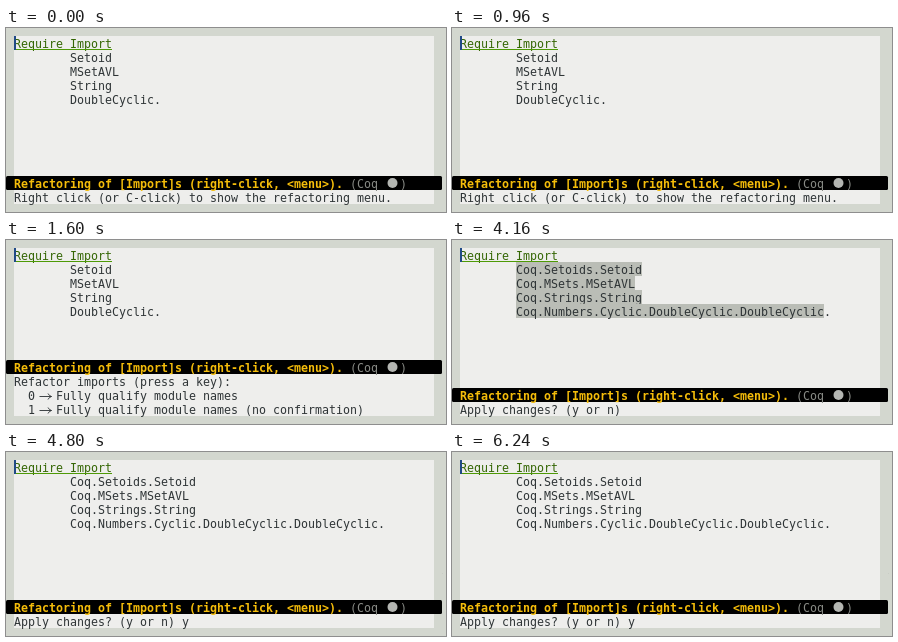
An HTML page for the animation above (7.2 s loop, 440x184 px).

```html
<!DOCTYPE html>
<html lang="en">
<head>
<meta charset="utf-8">
<title>Refactoring imports</title>
<style>
html, body { margin: 0; width: 100%; height: 100%; overflow: hidden; background: #d3d7cf; }
svg { display: block; }
/* 11.63px gives a 7px character cell */
text { font: 11.63px "DejaVu Sans Mono", monospace; fill: #2e3436; white-space: pre; }
.keyword { fill: #346604; }
.title { font-weight: bold; fill: #f5bd0a; }
.mode { fill: #888a85; }
</style>
</head>
<body>
<svg id="stage" width="440" height="184"></svg>
<script>
const LEFT = 8, COL = 7, ROW = 14, INDENT = 8;
const stage = document.getElementById("stage");

const rowTop = row => 8 + row * ROW;
const colX = col => LEFT + col * COL;
const escape = s => s.replace(/&/g, "&amp;").replace(/</g, "&lt;");
const rect = (x, y, w, h, fill, extra = "") =>
  `<rect x="${x}" y="${y}" width="${w}" height="${h}" fill="${fill}" ${extra}/>`;
const text = (col, row, s, cls = "") =>
  `<text x="${colX(col)}" y="${rowTop(row) + 12}" class="${cls}">${escape(s)}</text>`;

// Long arrow centred on its cell, wider than the cell itself
function arrow(col, row) {
  const x = colX(col) - 2.5, y = rowTop(row) + 8.5;
  return `<path d="M${x} ${y}h12m-3.5-3q1 2.3 3.5 3q-2.5 .7-3.5 3" fill="none" stroke="#2e3436" stroke-width=".9"/>`;
}

const short = ["Setoid", "MSetAVL", "String", "DoubleCyclic"];
const full = ["Coq.Setoids.Setoid", "Coq.MSets.MSetAVL", "Coq.Strings.String",
              "Coq.Numbers.Cyclic.DoubleCyclic.DoubleCyclic"];

const states = [
  { until: 1600, names: short, prompt: ["Right click (or C-click) to show the refactoring menu."] },
  { until: 3200, names: short, prompt: ["Refactor imports (press a key):",
      "  0   Fully qualify module names",
      "  1   Fully qualify module names (no confirmation)"] },
  { until: 4800, names: full, marked: true, prompt: ["Apply changes? (y or n)"] },
  { until: 7200, names: full, prompt: ["Apply changes? (y or n) y"] }
];

function modeLine(row) {
  const y = rowTop(row);
  return rect(0, y, 436, ROW, "#000", 'rx="1.5"') +
    text(0, row, "Refactoring of [Import]s (right-click, <menu>).", "title") +
    text(48, row, "(Coq", "mode") +
    `<circle cx="386.5" cy="${y + 7}" r="5" fill="#b4b6b2"/>` +
    `<text x="394" y="${y + 12}" class="mode">)</text>`;
}

function draw({ names, marked, prompt }) {
  const promptRow = 12 - prompt.length;
  let out = rect(LEFT, 8, 420, 168, "#eeeeec");
  out += text(0, 0, "Require Import", "keyword") + rect(LEFT, 21, 14 * COL, 1, "#4e9a06");
  out += rect(LEFT, 8, 2, ROW, "#204a87");
  names.forEach((name, i) => {
    if (marked) out += rect(colX(INDENT), rowTop(i + 1), name.length * COL, ROW, "#babdb6");
    out += text(INDENT, i + 1, name + (i === names.length - 1 ? "." : ""));
  });
  out += modeLine(promptRow - 1);
  prompt.forEach((line, i) => {
    out += text(0, promptRow + i, line);
    if (i) out += arrow(4, promptRow + i);
  });
  stage.innerHTML = out;
}

let shown;
function tick() {
  const t = performance.now() % 7200;
  const state = states.find(s => t < s.until);
  if (state !== shown) draw(shown = state);
  requestAnimationFrame(tick);
}
tick();
</script>
</body>
</html>
```
